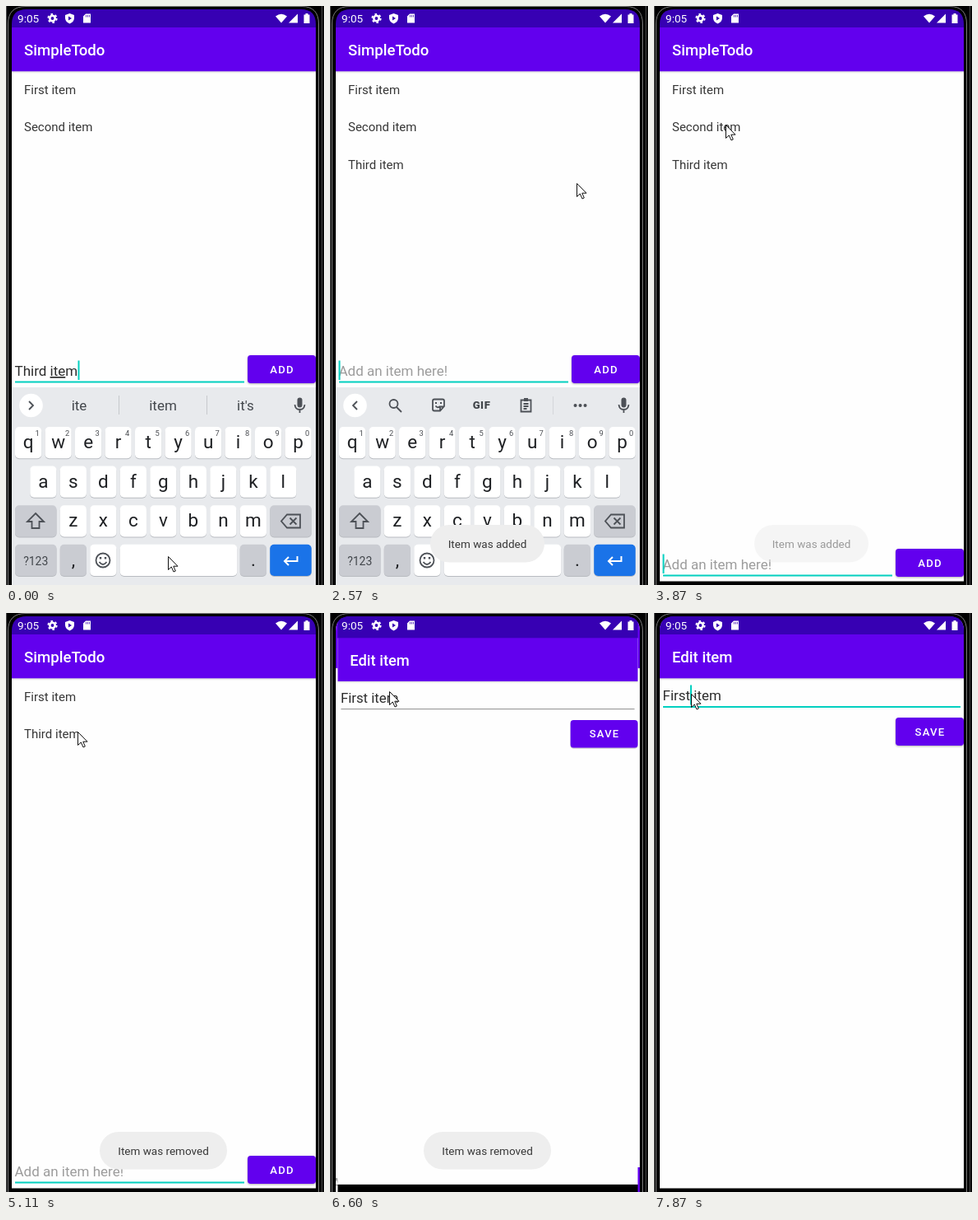
Write an HTML page that moves like this. It is 387 by 703 pixels and loops after 7.99 s.

```html
<!DOCTYPE html>
<html lang="en">
<head>
<meta charset="utf-8">
<title>Todo app demo</title>
<style>
  html, body { margin: 0; width: 100%; height: 100%; overflow: hidden; background: #000; }
  svg { display: block; width: 387px; height: 703px; font-family: Roboto, "Liberation Sans", sans-serif; }
  text { white-space: pre; }
  .title { font-size: 18.6px; font-weight: 500; fill: #fff; }
  .item { font-size: 15px; fill: #363636; }
  .field { font-size: 17px; fill: #2c2c2c; }
  .hint { fill: #9c9c9c; }
  .comp { text-decoration: underline; text-decoration-thickness: 1px; }
  .btn { font-size: 13.2px; font-weight: 500; letter-spacing: 1.18px; fill: #fff; }
  .toast { font-size: 13.5px; fill: #383838; }
  .key { font-size: 22.5px; fill: #1f2124; }
  .num { font-size: 9.3px; fill: #4a4d52; }
  .sug { font-size: 17px; fill: #43474c; }
  .btn, .toast, .key, .num, .sug { text-anchor: middle; }
  .line { fill: none; stroke: #4d5157; stroke-width: 1.8; }
  .teal { fill: #03d0c0; }
</style>
</head>
<body>
<svg viewBox="0 0 387 703">
  <defs>
    <clipPath id="screen"><path d="M7 703V22Q7 4 25 4H359Q377 4 377 22V703Z"/></clipPath>
    <linearGradient id="drop" x2="0" y2="1">
      <stop stop-opacity=".16"/><stop offset="1" stop-opacity="0"/>
    </linearGradient>
    <filter id="lift" x="-10%" y="-20%" width="120%" height="160%">
      <feDropShadow dx="0" dy="1" stdDeviation=".8" flood-opacity=".3"/>
    </filter>
  </defs>

  <rect width="387" height="703"/>
  <path d="M2.500 703V22Q2.500 .5 24 .5H360Q380.500 .5 380.500 22V703" fill="none" stroke="#7c7c7c"/>
  <path d="M.5 0V703M384.500 0V703" stroke="#4a4a4a"/>

  <g clip-path="url(#screen)">
    <g id="main">
      <rect x="7" y="26" width="370" height="673" fill="#fefefe"/>
      <text class="item" x="22" y="107.300">First item</text>
      <text class="item" id="second" x="22" y="152.400">Second item</text>
      <text class="item" id="third" x="22">Third item</text>
      <g id="entry">
        <text class="field" id="typed" x="10.500" y="449">Third <tspan class="comp" id="comp"></tspan><tspan id="tail"></tspan></text>
        <text class="field hint" id="hint" x="10.500" y="449">Add an item here!</text>
        <rect class="teal" x="11" y="455.500" width="279" height="2"/>
        <rect class="teal" id="caret" y="430.500" width="2" height="23.500"/>
        <rect x="294" y="424" width="83" height="34" rx="3.800" fill="#6200ee" filter="url(#lift)"/>
        <rect id="ripple" x="294" y="424" width="83" height="34" rx="3.800" fill="#fff"/>
        <text class="btn" x="336" y="446">ADD</text>
      </g>
      <rect x="7" y="698.500" width="370" height="30"/>
    </g>

    <g id="edit">
      <rect x="7" y="26" width="370" height="673" fill="#fefefe"/>
      <text class="field" x="10.500" y="106">First item</text>
      <rect id="rule" x="11" y="113" width="362"/>
      <rect class="teal" id="editCaret" x="44" y="87.500" width="2" height="24"/>
      <rect x="294" y="127" width="83" height="34" rx="3.800" fill="#6200ee" filter="url(#lift)"/>
      <text class="btn" x="336" y="148.800">SAVE</text>
      <rect x="7" y="698.500" width="370" height="30"/>
    </g>

    <g fill="#fff">
      <text x="14" y="20" font-size="13.600">9:05</text>
      <circle cx="56.500" cy="15" r="3.200" fill="none" stroke="#fff" stroke-width="2.600"/>
      <circle cx="56.500" cy="15" r="5.200" fill="none" stroke="#fff" stroke-width="1.800" stroke-dasharray="2.600 2.850"/>
      <path d="M77.500 9L83 11V15Q82.500 19.500 77.500 21.500Q72.500 19.500 72 15V11Z"/>
      <path d="M76 12.500V17.500L80 15Z" fill="#3700b3"/>
      <path d="M97 9.500H103V20.500H94V12.500Z"/>
      <path d="M97.500 11V13.500M99.500 11V13.500M101.500 11V13.500" stroke="#3700b3" stroke-width=".8"/>
      <path d="M328 12.500Q335 7 342 12.500L335 20.500Z"/>
      <path d="M355 9.500V20.500H344Z"/>
      <path d="M362.500 10.500H364.500V9H367.500V10.500H369.500V21H362.500Z"/>
    </g>

    <g id="kb">
      <rect x="7" y="463" width="370" height="260" fill="#e8eaed"/>
      <circle cx="30.500" cy="485" r="14.300" fill="#fff"/>
      <path class="line" id="chevron"/>
      <g id="words">
        <path d="M137.500 473V496M244.500 473V496" stroke="#c6c9cd"/>
        <text class="sug" x="89" y="491"></text>
        <text class="sug" x="191" y="491"></text>
        <text class="sug" x="291.500" y="491"></text>
      </g>
      <g id="tools">
        <g class="line">
          <circle cx="77.500" cy="483" r="5"/><path d="M81 487L87 493"/>
          <path d="M127 477.500H137Q139 477.500 139 479.500V486L134 491.500H127Q125 491.500 125 489.500V479.500Q125 477.500 127 477.500ZM134 491V486.500H139M128.500 485.500Q131 489 134 486"/>
          <path d="M129 481V483M135 481V483" stroke-width="2"/>
          <path d="M232.500 478.500H244.500V492.500H232.500ZM235.500 483H241.500M235.500 486H241.500M235.500 489H239.500"/>
          <path d="M236 478H241" stroke-width="4"/>
        </g>
        <text class="sug" x="184.500" y="488.800" style="font-size:13px;font-weight:900;letter-spacing:.6px">GIF</text>
        <path d="M271.500 474V496" stroke="#d4d6da"/>
        <path d="M298.500 485H298.600M304.500 485H304.600M310.500 485H310.600" stroke="#4d5157" stroke-width="4" stroke-linecap="round"/>
      </g>
      <rect x="354.500" y="475.500" width="6" height="12" rx="3" fill="#4d5157"/>
      <path class="line" d="M351.500 484Q352 490 357.500 490Q363 490 363.500 484M357.500 490V494"/>
      <g id="keys"></g>
      <g class="line">
        <path d="M36 616L46 626H40.500V634H31.500V626H26Z"/>
        <path d="M342 617.500H358V633.500H342L335 625.500ZM345.500 621.500L353.500 629.500M353.500 621.500L345.500 629.500"/>
        <circle cx="118" cy="673" r="8.500"/>
        <path d="M113.500 675Q118 681 122.500 675"/>
        <path d="M115 669V671.500M121 669V671.500" stroke-width="2.400"/>
        <path d="M354.500 668V674H339.500M344 669L339 674L344 679" stroke="#fff" stroke-width="2"/>
      </g>
    </g>

    <g id="added">
      <rect x="122" y="630" width="139" height="45.500" rx="22.700" fill="#eee"/>
      <text class="toast" x="191.500" y="658">Item was added</text>
    </g>
    <g id="removed">
      <rect x="114" y="630" width="155" height="45.500" rx="22.700" fill="#eee"/>
      <text class="toast" x="191.500" y="658">Item was removed</text>
    </g>
  </g>

  <path id="mouse" d="M.5 .5V16.500L4.300 13L7 19L9.300 18L6.800 12.200H12Z" fill="#fff" stroke="#111" stroke-linejoin="round"/>
</svg>

<script>
const LOOP = 7990, TICK = 120;
const $ = id => document.getElementById(id);
const set = (el, attrs) => { for (const k in attrs) el.setAttribute(k, attrs[k]); };
const show = (el, on) => set(el, { visibility: on ? 'visible' : 'hidden' });

function make(parent, tag, attrs, text) {
  const el = document.createElementNS('http://www.w3.org/2000/svg', tag);
  set(el, attrs);
  if (text) el.textContent = text;
  parent.append(el);
}

// App bar with the status bar's background
function appBar(parent, title) {
  const bar = (y, height, fill) => make(parent, 'rect', { x: 7, y, width: 370, height, fill });
  bar(79, 3, 'url(#drop)');
  bar(25, 54.3, '#6200ee');
  bar(-20, 46, '#3700b3');
  make(parent, 'text', { class: 'title', x: 22, y: 60 }, title);
}
appBar($('main'), 'SimpleTodo');
appBar($('edit'), 'Edit item');

// Keyboard
const LEFT = 11, PITCH = 36.5, KEY_W = 32.2, WIDE = 50.5, GREY = '#caccd2';
const keyX = col => LEFT + col * PITCH;
const keyY = row => 511 + row * 47.6;

function key(col, row, label, width = KEY_W, fill = '#fff', style = '') {
  const x = keyX(col), y = keyY(row), box = { x, width, height: 38.2, rx: 5 };
  make($('keys'), 'rect', { ...box, y: y + 1, fill: '#b9bcc1' });
  make($('keys'), 'rect', { ...box, y, fill });
  make($('keys'), 'text', { class: 'key', x: x + width / 2, y: y + (style ? 24.8 : 26), style }, label);
}
['qwertyuiop', 'asdfghjkl', 'zxcvbnm'].forEach((letters, row) =>
  [...letters].forEach((c, i) => key(i + (10 - letters.length) / 2, row, c)));
for (let i = 0; i < 10; i++)
  make($('keys'), 'text', { class: 'num', x: keyX(i) + 27, y: 521.5 }, String((i + 1) % 10));
key(0, 2, '', WIDE, GREY);
key(8.5, 2, '', WIDE, GREY);
key(0, 3, '?123', WIDE, GREY, 'font-size:14px;fill:#43474c');
key(1.5, 3, ',', KEY_W, GREY);
key(2.5, 3, '');
key(3.5, 3, '', 142.5);
key(7.5, 3, '.', KEY_W, GREY);
key(8.5, 3, '', WIDE, '#1a73e8');

// Progress 0..1 in n equal jumps, the first one at `start`
const steps = (t, start, n) => Math.max(0, Math.min(n, Math.floor((t - start) / TICK) + 1)) / n;
const ease = (k, power = 2) => 1 - (1 - k) ** power;
const fade = (t, from, to) => steps(t, from, 3) - steps(t, to, 4);
const zoom = s => `translate(192 351) scale(${s}) translate(-192 -351)`;

// Pointer moves: start, jumps, x, y, easing power
const MOVES = [
  [640, 5, 333, 449, 2], [1940, 4, 300, 215, 1.5], [2970, 8, 87, 144, 2],
  [5260, 6, 72, 95, 1], [6990, 4, 45, 98, 2]
];
function pointer(t) {
  let x = 197, y = 668;
  for (const [start, n, toX, toY, power] of MOVES) {
    const k = ease(steps(t, start, n), power);
    x += (toX - x) * k;
    y += (toY - y) * k;
  }
  return `translate(${x} ${y})`;
}

function draw(t) {
  const whole = t >= 120, pressed = t >= 1550, sent = t >= 1670, low = t >= 2820, focus = t >= 7750;

  // Entry field
  $('comp').textContent = whole ? 'item' : 'ite';
  $('tail').textContent = whole ? '' : 'm';
  show($('typed'), !sent);
  show($('hint'), sent);
  set($('entry'), { transform: `translate(0 ${low ? 235 : 0})` });
  const idle = pressed ? t - 1550 : Math.max(0, t - 150);
  set($('caret'), { x: sent ? 10.5 : 87.5 });
  show($('caret'), Math.floor(idle / 500) % 2 === 0);
  set($('ripple'), { opacity: pressed ? 0.24 * (1 - steps(t, 1670, 2)) : 0 });

  // List
  show($('third'), sent);
  set($('second'), { opacity: 1 - steps(t, 4720, 2) });
  set($('third'), { y: 197.6 - 45.2 * ease(steps(t, 4870, 3)) });

  // Keyboard
  const words = whole ? ['item', 'items', 'itemized'] : ['ite', 'item', "it's"];
  $('words').querySelectorAll('text').forEach((el, i) => { el.textContent = words[i]; });
  show($('words'), !sent);
  show($('tools'), sent);
  set($('chevron'), { d: sent ? 'M33 480L28 485L33 490' : 'M28 480L33 485L28 490' });
  set($('kb'), { transform: `translate(0 ${240 * steps(t, 2820, 3)})` });

  // Edit screen opens over the list
  const open = steps(t, 6480, 4), grow = ease(open, 3.5);
  set($('main'), { transform: zoom(1 + 0.05 * grow) });
  set($('edit'), { transform: zoom(0.85 + 0.15 * grow), opacity: Math.min(1, open * 2) });
  set($('rule'), focus ? { height: 2, fill: '#03d0c0' } : { height: 1, fill: '#8b8b8b' });
  show($('editCaret'), t >= 7870);

  set($('added'), { opacity: fade(t, 1790, 3750) });
  set($('removed'), { opacity: fade(t, 4870, 6870) });
  set($('mouse'), { transform: pointer(t) });
}

const start = performance.now();
function tick() {
  draw((performance.now() - start) % LOOP);
  requestAnimationFrame(tick);
}
tick();
</script>
</body>
</html>
```
